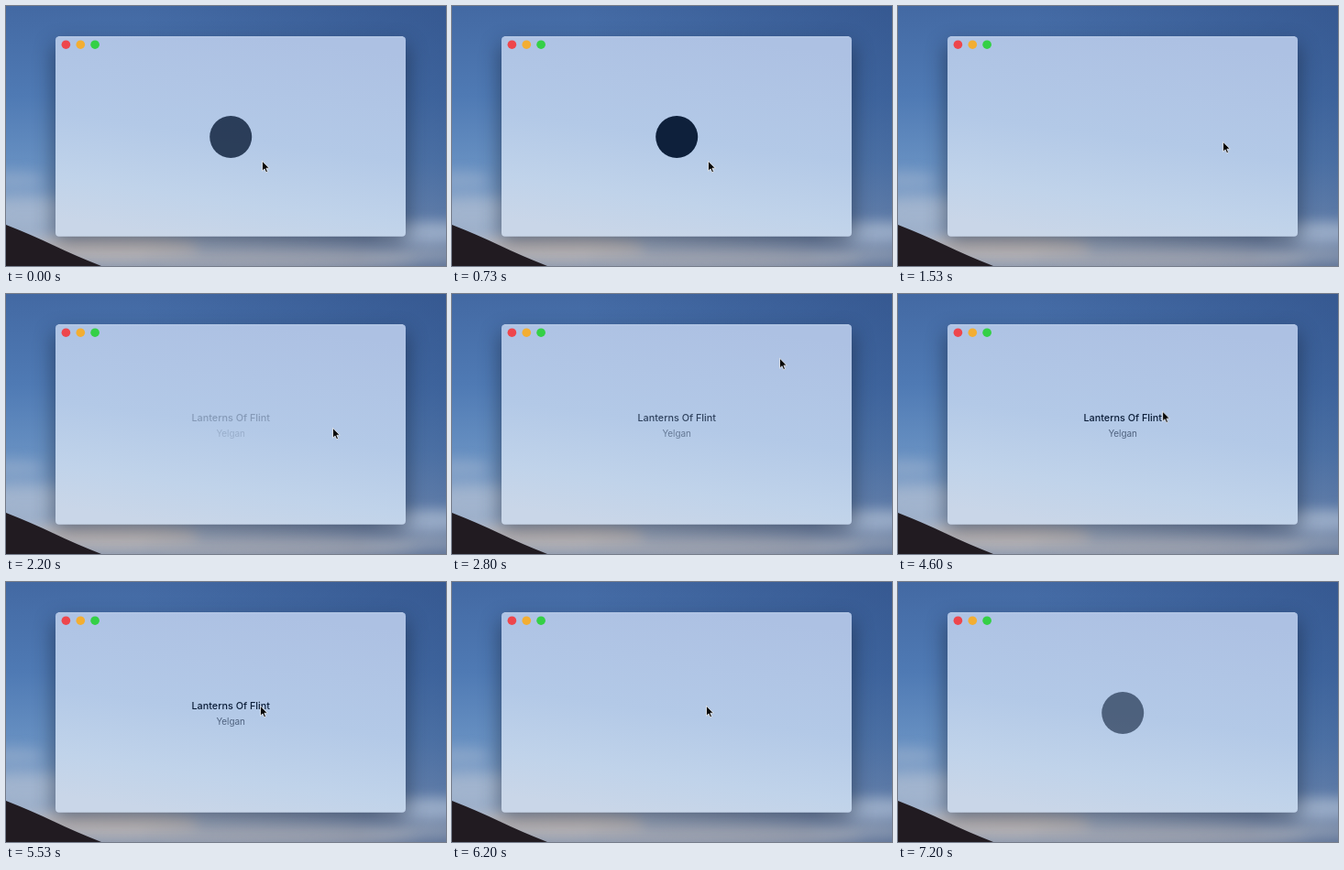
These frames come from a looping animation (480x284 px, 7.27 s). An HTML page:

```html
<!DOCTYPE html>
<html lang="en">
<head>
<meta charset="utf-8">
<title>Music window</title>
<style>
  html, body { margin: 0; width: 100%; height: 100%; overflow: hidden; background: #41669f; }
  svg { display: block; width: 480px; height: 284px; }
  text { font-family: Inter, Roboto, sans-serif; text-anchor: middle; fill: #0b1d38; }
  .title { font-size: 10.8px; font-weight: 500; }
  .artist { font-size: 9.9px; fill-opacity: .6; }
  .soft { filter: blur(7px); }
  .shadow { filter: blur(11px); }

  .badge, .track, .cursor { animation: 7270ms linear infinite; }
  .badge { animation-name: badge; }
  .track { animation-name: track; }
  .cursor { animation-name: cursor; }

  @keyframes badge {
    0% { opacity: .81; }
    5% { opacity: .93; }
    12%, 15.5% { opacity: 1; }
    19.3%, 86.5% { opacity: 0; }
    99% { opacity: .6; }
    100% { opacity: .64; }
  }
  @keyframes track {
    0%, 26% { opacity: 0; }
    32% { opacity: .38; }
    38.5% { opacity: .78; }
    47%, 82.4% { opacity: 1; }
    84.8%, 100% { opacity: 0; }
  }
  @keyframes cursor {
    0%, 15.1% { transform: translate(279px, 169px); }
    18.3% { transform: translate(332px, 156px); }
    21.05% { transform: translate(354px, 148px); }
    24.1%, 31.6% { transform: translate(356px, 146px); }
    34.8% { transform: translate(357px, 101px); }
    38.5% { transform: translate(357px, 70px); }
    45% { transform: translate(353px, 13px); }
    46.8% { transform: translate(349px, -18px); }
    56.4% { transform: translate(330px, -18px); }
    59.6% { transform: translate(312px, 60px); }
    63.3% { transform: translate(288px, 128px); }
    66% { transform: translate(279px, 139px); }
    67%, 86% { transform: translate(277px, 135px); }
    92.6% { transform: translate(295px, 16px); }
    94.9%, 100% { transform: translate(349px, -18px); }
  }
</style>
</head>
<body>
<svg viewBox="0 0 480 284">
  <defs>
    <linearGradient id="sky" x2="0" y2="1">
      <stop offset="0" stop-color="#4369a3"/>
      <stop offset=".35" stop-color="#4f7ab4"/>
      <stop offset=".6" stop-color="#668fc1"/>
      <stop offset=".8" stop-color="#86a3c8"/>
      <stop offset=".9" stop-color="#aab7cb"/>
      <stop offset="1" stop-color="#8f9bb0"/>
    </linearGradient>
    <linearGradient id="east">
      <stop offset=".3" stop-color="#27467d" stop-opacity="0"/>
      <stop offset="1" stop-color="#27467d" stop-opacity=".46"/>
    </linearGradient>
    <linearGradient id="glass" x1=".6" y1="0" x2=".35" y2="1">
      <stop offset="0" stop-color="#adc1e3"/>
      <stop offset=".5" stop-color="#b3c9e7"/>
      <stop offset=".8" stop-color="#c0d3ea"/>
      <stop offset="1" stop-color="#c9d6e8"/>
    </linearGradient>
  </defs>

  <rect width="480" height="284" fill="url(#sky)"/>
  <rect width="480" height="284" fill="url(#east)"/>
  <g class="soft">
    <ellipse cx="8" cy="190" rx="34" ry="9" fill="#9fb3d0" opacity=".5"/>
    <ellipse cx="22" cy="224" rx="60" ry="16" fill="#b4c0d2" opacity=".6"/>
    <ellipse cx="120" cy="264" rx="90" ry="14" fill="#c6bbb6" opacity=".75"/>
    <ellipse cx="300" cy="276" rx="150" ry="12" fill="#a9aab2" opacity=".7"/>
    <ellipse cx="460" cy="247" rx="60" ry="11" fill="#a9bad2" opacity=".75"/>
    <ellipse cx="450" cy="272" rx="60" ry="7" fill="#a4adbd" opacity=".6"/>
  </g>

  <rect class="shadow" x="52" y="42" width="386" height="216" rx="6" fill="#101a2e" opacity=".5"/>
  <path d="M0 239Q28 250 52 261.5T104 284H0Z" fill="#211b21"/>
  <rect x="54" y="33.2" width="382" height="218.6" rx="4" fill="url(#glass)"/>
  <path d="M57 33.7H433" stroke="#bfd0ea" stroke-width=".9"/>
  <circle cx="65.4" cy="42.2" r="4.8" fill="#ee464c"/>
  <circle cx="81.3" cy="42.2" r="4.8" fill="#f3ae32"/>
  <circle cx="97.1" cy="42.2" r="4.8" fill="#34d046"/>

  <circle class="badge" cx="245.2" cy="143" r="23" fill="#0b1d38"/>
  <g class="track">
    <text class="title" x="245.2" y="139">Lanterns Of Flint</text>
    <text class="artist" x="245.2" y="155.8">Yelgan</text>
  </g>

  <path class="cursor" d="M.5 .3V11.2L3 8.9 4.7 12.8 6.5 12 4.9 8.2H8.3Z"
        fill="#080808" stroke="#f4f6fa" stroke-width=".8"/>
</svg>
</body>
</html>
```
